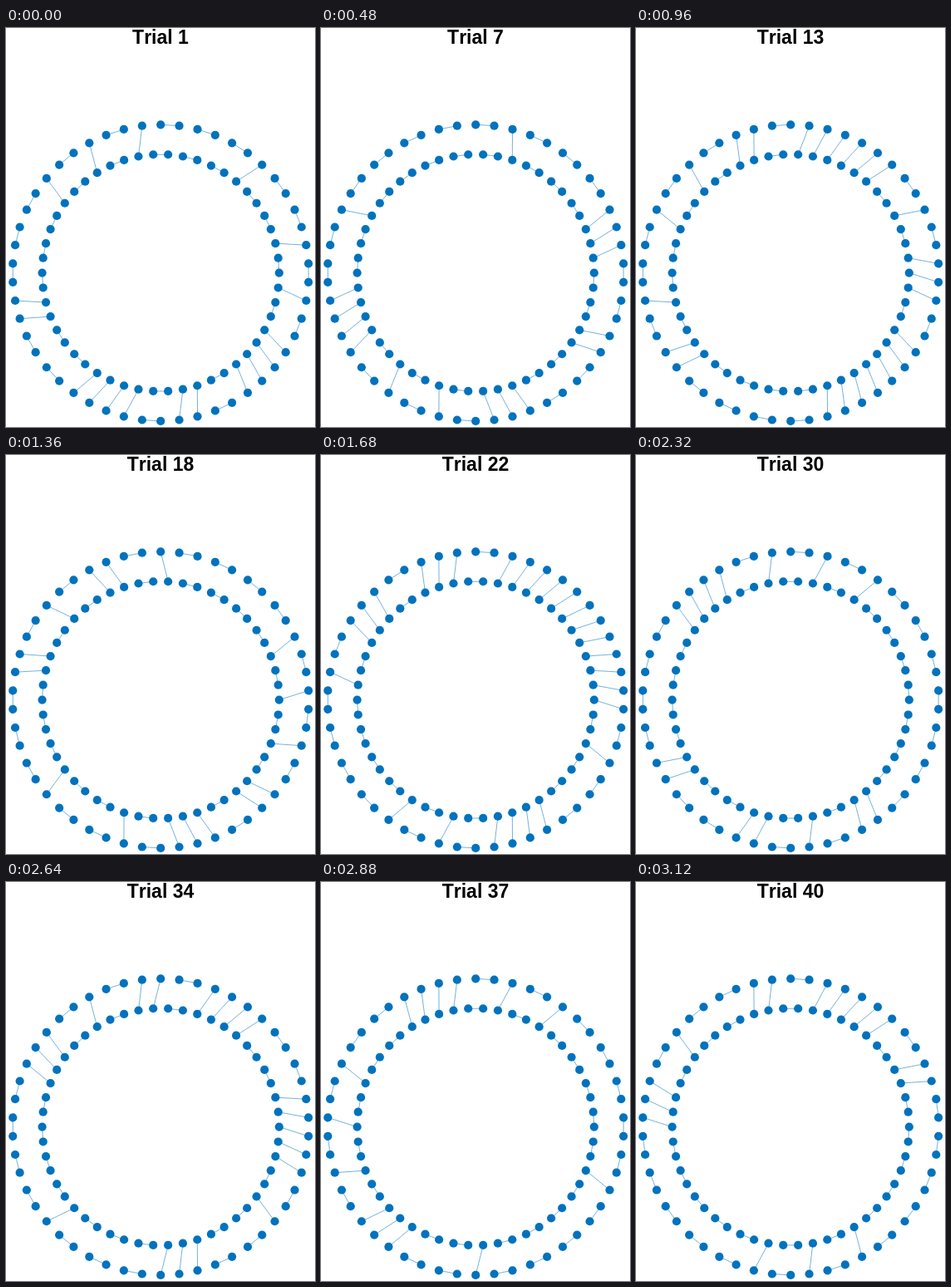
Write an HTML page that moves like this. It is 372 px wide and 480 px high and loops after 3.2 s.

```html
<!DOCTYPE html>
<html lang="en">
<head>
<meta charset="utf-8">
<title>Random matchings on a ring</title>
<style>
  html, body { margin: 0; width: 100%; height: 100%; overflow: hidden; background: #fff; }
  svg { display: block; }
  text { font: bold 23px "Liberation Sans", Arial, sans-serif; font-kerning: none; text-anchor: middle; }
  path { fill: none; stroke: #0072bd; stroke-width: .55; }
  circle { fill: #0072bd; }
</style>
</head>
<body>
<svg width="372" height="480" viewBox="0 0 372 480">
  <text id="title" x="186" y="19"></text>
  <path id="edges"/>
  <g id="dots"></g>
</svg>
<script>
const N = 50, TRIALS = 40, STEP = 80;
const RADIUS = 178.3, SPOKE_CHANCE = 0.48;
const title = document.getElementById('title');
const edges = document.getElementById('edges');
const dots = document.getElementById('dots');

const place = (radius, turn) => {
  const a = turn * 2 * Math.PI / N;
  return [186.2 + radius * Math.sin(a), 294.6 - radius * Math.cos(a)].map(v => v.toFixed(2));
};
const outer = i => place(RADIUS, i);
const inner = i => place(RADIUS * 0.8, i + 0.5);
const line = (a, b) => `M${a}L${b}`;

// Small seeded generator, so every loop repeats the same trials
function randomizer(seed) {
  return () => {
    seed = (seed + 0x6d2b79f5) | 0;
    let t = Math.imul(seed ^ (seed >>> 15), seed | 1);
    t ^= t + Math.imul(t ^ (t >>> 7), t | 61);
    return ((t ^ (t >>> 14)) >>> 0) / 2 ** 32;
  };
}

// Every dot gets one partner: a spoke between the rings, or a neighbour on its own ring
function matching(trial) {
  const random = randomizer(trial);
  const shift = random() < 0.5 ? 0 : 1;
  const start = Math.floor(random() * N);
  const end = start + N;
  let d = '';
  for (let i = start; i < end; i++) {
    const j = i - shift;
    if (i === end - 1 || random() < SPOKE_CHANCE) {
      d += line(outer(i), inner(j));
    } else {
      d += line(outer(i), outer(i + 1)) + line(inner(j), inner(j + 1));
      i++;
    }
  }
  return d;
}

for (let i = 0; i < N; i++) {
  for (const [x, y] of [outer(i), inner(i)]) {
    dots.innerHTML += `<circle cx="${x}" cy="${y}" r="5.1"/>`;
  }
}

let shown = 0;
function draw() {
  const trial = Math.floor(performance.now() / STEP) % TRIALS + 1;
  if (trial !== shown) {
    shown = trial;
    title.textContent = `Trial ${trial}`;
    edges.setAttribute('d', matching(trial));
  }
  requestAnimationFrame(draw);
}
draw();
</script>
</body>
</html>
```
